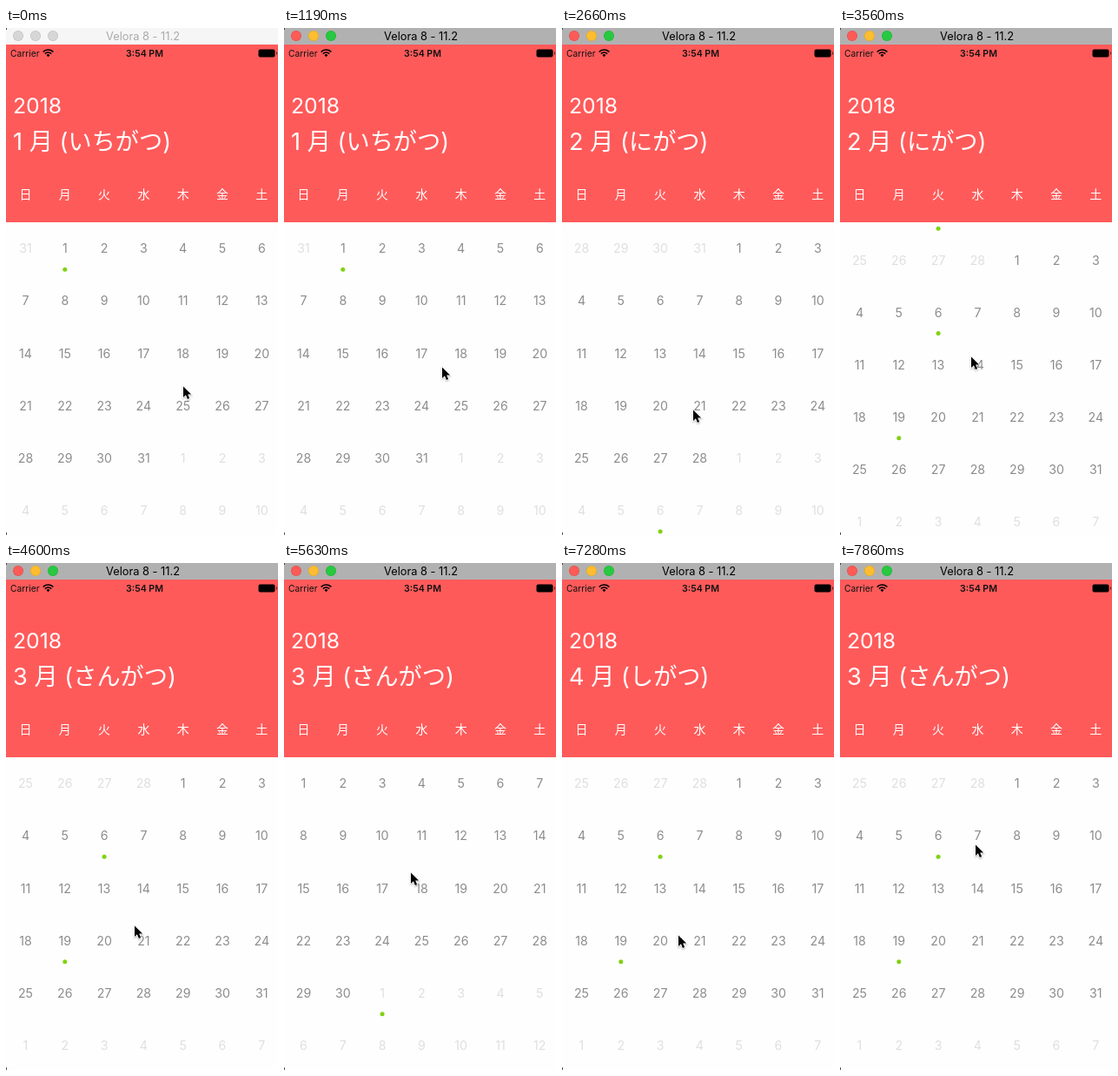
Animation of 313 by 582 pixels, one loop 8000 ms. Source, as an HTML page with a canvas:

```html
<!DOCTYPE html>
<html lang="ja">
<head>
<meta charset="utf-8">
<title>Calendar</title>
<style>
  html, body { margin: 0; width: 100%; height: 100%; overflow: hidden; background: #fff; }
  canvas { display: block; width: 313px; height: 582px; }
</style>
</head>
<body>
<canvas id="stage"></canvas>
<script>
const W = 313, H = 582, LOOP = 8000, STEP = LOOP / 54;
const TOP = 223, ROW = 60.15, PAGE = ROW * 6;
const SANS = 'Inter, "Noto Sans CJK JP", "Noto Sans CJK", sans-serif';
const HOLD = 3, SETTLE = 3, GLIDE = 6, PULL = 70;

const canvas = document.getElementById('stage');
const ctx = canvas.getContext('2d');
const dpr = window.devicePixelRatio || 1;
canvas.width = W * dpr;
canvas.height = H * dpr;

// Each swipe: step of the press, pointer position, page it leads to, first drag in px
const swipes = [
  { press: 1, x: 203, y: 410, page: 0, drag: 0 },
  { press: 8, x: 181, y: 388, page: 1, drag: -5 },
  { press: 20, x: 150, y: 437, page: 2, drag: 4 },
  { press: 33, x: 147, y: 415, page: 3, drag: 11 },
  { press: 44, x: 130, y: 373, page: 2, drag: -87 },
  { press: 99, x: 155, y: 322 }
];
const readings = ['いちがつ', 'にがつ', 'さんがつ', 'しがつ'];
const events = ['0/1', '2/6', '2/19', '4/1'];

const clamp = v => Math.max(0, Math.min(1, v));
const mix = (a, b, u) => a + (b - a) * u;

// Press, drag a little, hold, flick to the page, then glide to the next press
function pose(n) {
  const i = Math.max(0, swipes.findIndex(s => s.press > n) - 1);
  const s = swipes[i], next = swipes[i + 1];
  const from = i ? swipes[i - 1].page : 0;
  const flick = n - s.press - HOLD;
  const drag = s.drag * clamp(n - s.press);
  if (flick < 0) {
    return { scroll: from * PAGE + drag, x: s.x, y: s.y - drag, month: from };
  }
  const ease = 1 - (1 - clamp((flick + 1) / SETTLE)) ** 3;
  const u = clamp(flick / GLIDE);
  return {
    scroll: mix(from * PAGE + drag, s.page * PAGE, ease),
    x: mix(s.x, next.x, u * u),
    y: mix(s.y - drag - PULL * (s.page - from), next.y, Math.sin(u * Math.PI / 2)),
    month: flick < SETTLE ? from : s.page
  };
}

function text(str, x, y, size, color, weight = 400, align = 'center') {
  ctx.font = `${weight} ${size}px ${SANS}`;
  ctx.fillStyle = color;
  ctx.textAlign = align;
  ctx.fillText(str, x, y);
}

function rect(x, y, w, h, color) {
  ctx.fillStyle = color;
  ctx.fillRect(x, y, w, h);
}

function dot(x, y, r, color) {
  ctx.fillStyle = color;
  ctx.beginPath();
  ctx.arc(x, y, r, 0, Math.PI * 2);
  ctx.fill();
}

const column = i => 22.5 + 45.3 * i;

function drawPage(month, top) {
  const lead = new Date(2018, month, 1).getDay();
  for (let i = 0; i < 42; i++) {
    const day = new Date(2018, month, 1 - lead + i);
    const x = column(i % 7), y = top + 30 + ROW * Math.floor(i / 7);
    const inside = day.getMonth() === month;
    text(day.getDate(), x, y + 5.3, 14.2, inside ? '#8c8c8c' : '#dfdfdf');
    if (events.includes(day.getMonth() + '/' + day.getDate())) dot(x, y + 24.2, 2.5, '#7ed30f');
  }
}

function drawGrid(scroll) {
  ctx.save();
  ctx.beginPath();
  ctx.rect(0, TOP, W, H - TOP);
  ctx.clip();
  for (let m = 0; m < 4; m++) {
    const top = TOP + m * PAGE - scroll;
    if (top < H && top + PAGE > TOP) drawPage(m, top);
  }
  ctx.restore();
}

function drawTitleBar(active) {
  rect(0, 0, W, 20, active ? '#b1b1b1' : '#f6f6f6');
  const lights = active ? ['#fc5b57', '#fdbd2e', '#28c840'] : Array(3).fill('#d6d6d6');
  lights.forEach((c, i) => {
    dot(14 + 20 * i, 9, 6, c);
    dot(14 + 20 * i, 9, 6, 'rgba(0,0,0,.1)');
    dot(14 + 20 * i, 9, 5.4, c);
  });
  text('Velora 8 - 11.2', 157.5, 14, 12.8, active ? '#000' : '#aaa');
  rect(0, 0, 1, 2, '#444');
}

function drawStatus() {
  text('Carrier', 5, 32.5, 10.3, '#111', 400, 'left');
  text('3:54 PM', 159.5, 32.5, 10.6, '#111', 600);
  ctx.strokeStyle = ctx.fillStyle = '#000';
  ctx.lineWidth = 1.7;
  for (const r of [8, 5]) {
    ctx.beginPath();
    ctx.arc(48.5, 33, r, -Math.PI * 0.76, -Math.PI * 0.24);
    ctx.stroke();
  }
  ctx.beginPath();
  ctx.moveTo(48.5, 33.3);
  ctx.arc(48.5, 33, 2.8, -Math.PI * 0.76, -Math.PI * 0.24);
  ctx.fill();
  ctx.beginPath();
  ctx.roundRect(290.5, 24.5, 19, 9, 2);
  ctx.fill();
  rect(311, 27.5, 1, 3, '#5a2020');
}

function drawHeader(month) {
  rect(0, 19, W, TOP - 19, '#ff5a5a');
  drawStatus();
  text('2018', 8, 98, 24.8, '#fff', 400, 'left');
  text(`${month + 1} 月 (${readings[month]})`, 8, 140, 27.2, '#fff', 400, 'left');
  [...'日月火水木金土'].forEach((d, i) => text(d, column(i), 195.5, 14, '#fff', 300));
}

function drawPointer(x, y) {
  const shape = new Path2D('M0 0V14.4L3.4 11.2L5.7 16.8L8.3 15.7L6 10.4H10.6Z');
  ctx.save();
  ctx.translate(x + 1, y + 1.5);
  ctx.scale(0.86, 0.86);
  ctx.shadowColor = 'rgba(0,0,0,.3)';
  ctx.shadowBlur = 2 * dpr;
  ctx.shadowOffsetY = dpr;
  ctx.lineWidth = 1.8;
  ctx.strokeStyle = '#fff';
  ctx.stroke(shape);
  ctx.shadowColor = 'transparent';
  ctx.fillStyle = '#000';
  ctx.fill(shape);
  ctx.restore();
}

function draw(now) {
  const n = Math.floor((now % LOOP + 10) / STEP);
  const { scroll, x, y, month } = pose(n);
  ctx.setTransform(dpr, 0, 0, dpr, 0, 0);
  rect(0, 0, W, H, '#fefefe');
  drawGrid(scroll);
  drawTitleBar(n >= swipes[1].press);
  drawHeader(month);
  rect(0, 579, 1, 3, '#555');
  drawPointer(Math.round(x), Math.round(y));
}

let start;
function loop(now) {
  start ??= now;
  draw(now - start);
  requestAnimationFrame(loop);
}
draw(0);
requestAnimationFrame(loop);
</script>
</body>
</html>
```
